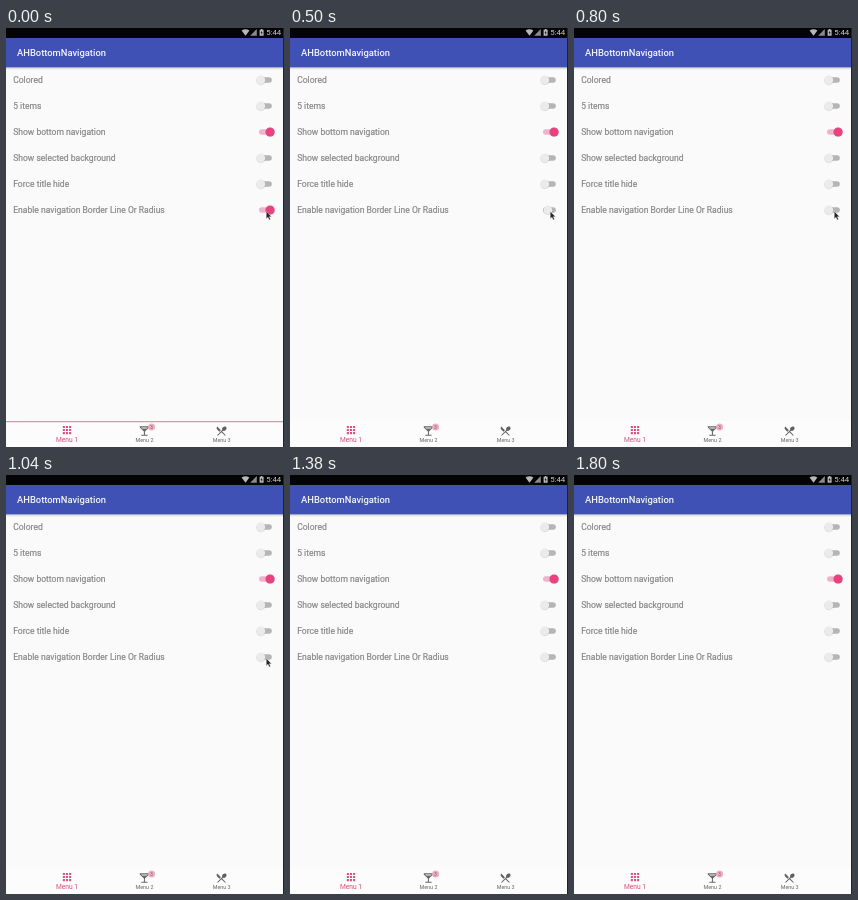
An HTML page that plays this animation: 278x419 px, repeating every 2000 ms.

```html
<!DOCTYPE html>
<html lang="en">
<head>
<meta charset="utf-8">
<title>Bottom navigation demo</title>
<style>
  html, body { margin: 0; width: 100%; height: 100%; overflow: hidden; background: #fafafa; }
  svg { display: block; width: 278px; height: 419px; font-family: Roboto, Arial, sans-serif; }
  .label { font-size: 8.55px; fill: #868686; stroke: #868686; stroke-width: .2px; }
  .title { font-size: 9.4px; font-weight: 500; fill: #f4f4fa; }
  .tab { font-size: 5.4px; fill: #666; text-anchor: middle; }
  .tab.active { font-size: 6.65px; fill: #d64a7c; }
  .badge { font-size: 4.5px; fill: #8d4a68; text-anchor: middle; }

  /* one two-second loop, all changes are hard steps */
  .step { animation: 2s step-end infinite; }
  .press { animation-name: press; }
  .border { animation-name: border; }
  .pointer { animation-name: pointer; }
  .on { animation-name: border; }
  .off { animation-name: off; }
  .slide { animation-name: slide; }

  @keyframes press { 0% { opacity: 0 } 10% { opacity: 1 } 25%, 100% { opacity: 0 } }
  @keyframes border { 0% { opacity: 1 } 25%, 100% { opacity: 0 } }
  @keyframes off { 0% { opacity: 0 } 25%, 100% { opacity: 1 } }
  @keyframes pointer { 0% { opacity: 1 } 60%, 100% { opacity: 0 } }
  @keyframes slide { 0% { transform: translateX(3px) } 40%, 100% { transform: none } }
</style>
</head>
<body>
<svg viewBox="0 0 278 419">
  <defs>
    <linearGradient id="shade" x2="0" y2="1">
      <stop stop-color="#000" stop-opacity=".2"/>
      <stop offset="1" stop-color="#000" stop-opacity="0"/>
    </linearGradient>
    <rect id="track" x="253" y="-2.7" width="12.8" height="5.4" rx="2.7"/>
    <g id="thumb-off">
      <circle cx="254.9" cy=".5" r="4.7" fill="#000" opacity=".13"/>
      <circle cx="254.9" r="4.4" fill="#ebebeb"/>
    </g>
    <g id="switch-off"><use href="#track" fill="#b5b5b5"/><use href="#thumb-off"/></g>
    <g id="switch-on">
      <use href="#track" fill="#f0b4ca"/>
      <circle cx="264.1" cy=".4" r="4.8" fill="#000" opacity=".12"/>
      <circle cx="264.1" r="4.6" fill="#e8437f"/>
    </g>
  </defs>

  <rect width="278" height="419" fill="#fafafa"/>

  <!-- status bar and toolbar -->
  <rect y="39" width="278" height="3" fill="url(#shade)"/>
  <rect y="10" width="278" height="29.3" fill="#3f51b5"/>
  <rect width="278" height="10" fill="#040406"/>
  <g fill="#b8b8b8">
    <path d="M235.6 2.6Q239.5-.2 243.4 2.6L239.5 7.8Z"/>
    <path d="M250.8 1V7.8H244.2Z" opacity=".75"/>
    <path d="M253.6 1.8h1.2V1h1.6v.8h1.2v6h-4z"/>
    <path d="M256 2.7l-1.5 2.4h.9v1.8l1.4-2.5h-.8z" fill="#222"/>
    <text x="260.2" y="7.3" font-size="7.8" fill="#ccc">5:44</text>
  </g>
  <text class="title" x="11" y="27.7">AHBottomNavigation</text>

  <!-- settings -->
  <rect class="step press" y="169" width="278" height="26" fill="#dfdfdf"/>
  <g id="rows"></g>
  <g transform="translate(0 182)">
    <g class="step on"><use href="#switch-on"/></g>
    <g class="step off">
      <use href="#track" fill="#b5b5b5"/>
      <g class="step slide"><use href="#thumb-off"/></g>
    </g>
  </g>
  <path class="step pointer" d="M260.3 183.5v7.2l1.7-1.5 1.2 2.7 1.3-.6-1.2-2.6h2.2z"
        fill="#222" stroke="#fff" stroke-width=".35"/>

  <!-- bottom navigation -->
  <rect y="392.5" width="278" height="27" fill="#fcfcfc"/>
  <rect class="step border" y="393.2" width="278" height="1" fill="#e8709a"/>
  <path transform="translate(54.75 395.8) scale(.52)" fill="#dc5083"
        d="M4 4h4v4H4zm6 0h4v4h-4zm6 0h4v4h-4zM4 10h4v4H4zm6 0h4v4h-4zm6 0h4v4h-4zM4 16h4v4H4zm6 0h4v4h-4zm6 0h4v4h-4z"/>
  <path transform="translate(132.2 396.8) scale(.52)" fill="#666"
        d="M11 13v6H6v2h12v-2h-5v-6l8-8V3H3v2zM7.5 7l-2-2h13l-2 2z"/>
  <path transform="translate(209.2 396.8) scale(.52)" fill="#606060"
        d="M8.1 13.34l2.83-2.83L3.91 3.5c-1.56 1.56-1.56 4.09 0 5.66zm6.78-1.81c1.53.71 3.68.21 5.27-1.38 1.91-1.91 2.28-4.65.81-6.12-1.46-1.46-4.2-1.1-6.12.81-1.59 1.59-2.09 3.74-1.38 5.27L3.7 19.87l1.41 1.41L12 14.41l6.88 6.88 1.41-1.41L13.41 13z"/>
  <circle cx="145.6" cy="399" r="3.5" fill="#ecb0c0"/>
  <text class="badge" x="145.6" y="400.7">3</text>
  <text class="tab active" x="61" y="414.2">Menu 1</text>
  <text class="tab" x="138.5" y="414.2">Menu 2</text>
  <text class="tab" x="215.7" y="414.2">Menu 3</text>

  <!-- dark right edge of the screen -->
  <rect x="277" width="1" height="419" fill="#222"/>
</svg>
<script>
  const labels = ['Colored', '5 items', 'Show bottom navigation', 'Show selected background',
    'Force title hide', 'Enable navigation Border Line Or Radius'];
  const last = labels.length - 1;

  // the last row has its own animated switch
  document.getElementById('rows').innerHTML = labels.map((label, i) => {
    const y = 52 + 26 * i;
    const toggle = i === last ? '' : `<use href="#switch-${i === 2 ? 'on' : 'off'}" y="${y}"/>`;
    return `<text class="label" x="7.2" y="${y + 3}">${label}</text>${toggle}`;
  }).join('');
</script>
</body>
</html>
```
